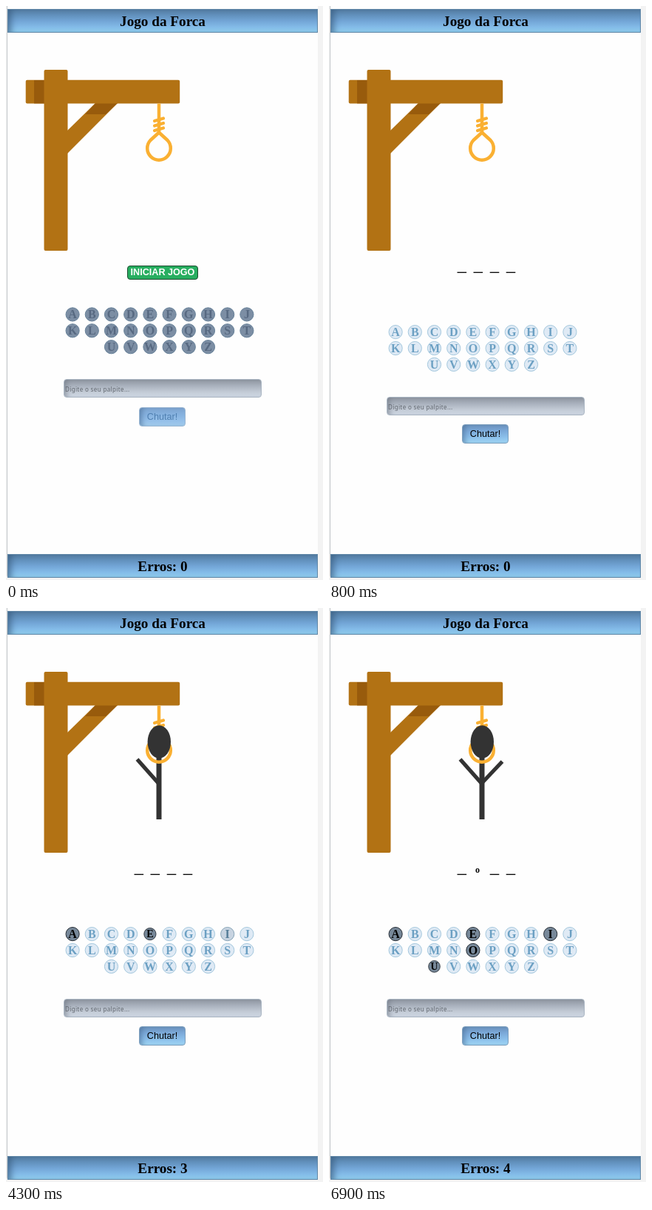
Write an HTML page that moves like this. It is 429 by 774 pixels and loops after 8000 ms.

```html
<!DOCTYPE html>
<html lang="pt">
<head>
<meta charset="utf-8">
<title>Jogo da Forca</title>
<style>
html, body { margin: 0; width: 100%; height: 100%; overflow: hidden; background: #f3f3f3; }
#stage { position: absolute; left: 0; top: 0; width: 429px; height: 774px; overflow: hidden; }
#stage > * { position: absolute; box-sizing: border-box; }
#page { left: 1px; top: 0; width: 421px; height: 771px; background: #fefefe;
  border-left: 1px solid #c4c8cc; border-bottom: 1px solid #b4bcc2; border-bottom-left-radius: 4px; }
.bar { left: 2px; width: 420px; height: 32px; border: 1px solid #5f86a6;
  background: linear-gradient(#547da3, #6291bd 25%, #73a6d7 52%, #83bbe8 78%, #92d0f1);
  box-shadow: inset 8px 0 9px -4px rgba(50, 85, 120, .65);
  font: bold 19.2px/32px "Liberation Serif", "Times New Roman", serif;
  text-align: center; color: #000; line-height: 31px; }
#guess { left: 78px; width: 268px; height: 25px; border: 1px solid #a9b5c2; border-radius: 4px;
  background: linear-gradient(#9097a2, #a9b1bd 35%, #c2cad5 70%, #d3dce8);
  box-shadow: inset 6px 0 7px -3px rgba(110, 118, 130, .6);
  font: 8px/25px "Noto Sans", sans-serif; letter-spacing: .37px; color: #626870; padding-left: 1px; }
#kick { left: 180px; width: 63px; height: 26px; border: 1px solid #7d9fbd; border-radius: 4px;
  background: linear-gradient(#6c94bf, #7caada 35%, #8cc0eb 70%, #a2daf8);
  box-shadow: inset 6px 0 7px -3px rgba(70, 105, 145, .6);
  font: 12.6px/24px "Liberation Sans", Arial, sans-serif; text-align: center; color: #000; }
#kick.off { color: #4f7fb0; border-color: #9ab6d2;
  background: linear-gradient(#7fa6d2, #87b3e0 40%, #96c1ea 75%, #a5d0f0); }
#start { left: 164px; top: 350px; width: 96px; height: 19px; border: 1px solid #1b4a2e;
  border-radius: 4px; background: #27ae60; color: #fff;
  font: bold 12.6px/17px "Liberation Sans", Arial, sans-serif; text-align: center; white-space: nowrap; }
svg { left: 0; top: 0; }
svg text { font-family: "Liberation Serif", "Times New Roman", serif; font-weight: bold; text-anchor: middle; }
</style>
</head>
<body>
<div id="stage">
  <div id="page"></div>
  <div class="bar" style="top:4px">Jogo da Forca</div>
  <div class="bar" style="top:739px" id="errors">Erros: 0</div>
  <div id="start">INICIAR JOGO</div>
  <div id="guess">Digite o seu palpite...</div>
  <div id="kick">Chutar!</div>
  <svg width="429" height="774" viewBox="0 0 429 774">
    <g fill="#b27214">
      <path d="M83 168L122 130H152L83 199Z"/>
      <path d="M122 130H152L135 146H107Z" fill="#985b0c"/>
      <rect x="26.7" y="99.8" width="208.5" height="31.8" rx="2"/>
      <rect x="38" y="100" width="14" height="31.4" fill="#985b0c"/>
      <rect x="51.5" y="86" width="32" height="244" rx="2"/>
    </g>
    <g stroke="#333" fill="none">
      <path id="body" d="M207 195V285" stroke-width="7"/>
      <path id="armL" d="M177.5 204L206 236" stroke-width="5.2"/>
      <path id="armR" d="M234.5 207L206 237" stroke-width="5.2"/>
    </g>
    <g stroke="#fab032" stroke-width="4.5" fill="none" stroke-linecap="round">
      <path d="M207 131.5V172" stroke-linecap="butt"/>
      <path d="M201 155L213 151.5M201 161.5L213 158M201 168L213 164.5" stroke-width="4.2"/>
      <path d="M207 170.5L195.5 181A15.8 15.8 0 1 0 218.5 181Z" stroke-linejoin="round"/>
    </g>
    <ellipse id="head" cx="207.3" cy="180.5" rx="15.7" ry="22.2" fill="#333"/>
    <g id="word" stroke="#000" stroke-width="1.3"></g>
    <text id="found" x="201" y="357" font-size="12">o</text>
    <g id="keys" font-size="16"></g>
  </svg>
</div>
<script>
const LOOP = 8000, BEGIN = 500;
const CLICKS = { A: 2100, E: 3300, I: 4300, O: 5400, U: 6600 };
const times = Object.values(CLICKS);
const MISSES = [2100, 3300, 4300, 6600];
const SHOWN = { head: 2200, body: 3300, armL: 4300, armR: 6600, found: 5400 };

// Colours: fill, letter, outline
const LOCKED = [[124, 142, 164], [87, 105, 129], [101, 128, 152]];
const WAKING = [[130, 146, 166], [98, 114, 137], [130, 146, 166]];
const READY = [[223, 234, 245], [108, 160, 195], [163, 199, 221]];
const USED = [[119, 136, 153], [0, 0, 0], [35, 42, 50]];
const FADE_IN = [0, .4, .8, 1];
const PRESS = [.22, .6, .88, 1];

const $ = id => document.getElementById(id);
const add = (parent, tag, attrs) => {
  const el = document.createElementNS("http://www.w3.org/2000/svg", tag);
  for (const k in attrs) el.setAttribute(k, attrs[k]);
  return parent.appendChild(el);
};

// Transitions advance in steps of 100 ms
const stepped = (t, from, table) =>
  t < from ? 0 : table[Math.min(3, Math.floor((t - from) / 100))];
const mix = (a, b, p) => a.map((c, i) =>
  "rgb(" + c.map((v, j) => Math.round(v + (b[i][j] - v) * p)) + ")");

const dashes = [173.5, 195.5, 217.7, 239.7].map(x =>
  add($("word"), "path", { d: `M${x} 359.3h12.6` }));

const keys = [..."ABCDEFGHIJKLMNOPQRSTUVWXYZ"].map((ch, i) => {
  const row = Math.floor(i / 10), col = i % 10 + (row === 2 ? 2 : 0);
  const g = add($("keys"), "g", {});
  const disc = add(g, "circle", { r: 9.1 });
  const label = add(g, "text", { y: 5.2 });
  label.textContent = ch;
  return { ch, g, disc, label, x: 90.1 + col * 26.2, y: 439.6 + row * 21.9 };
});

function drawKey(key, t, shift) {
  const click = CLICKS[key.ch];
  let colours, scale = 1;
  if (t < BEGIN) colours = mix(LOCKED, LOCKED, 0);
  else if (click === undefined || t < click) colours = mix(WAKING, READY, stepped(t, BEGIN, FADE_IN));
  else {
    const next = times[times.indexOf(click) + 1] ?? Infinity;
    colours = mix(READY, USED, stepped(t, click, PRESS));
    const held = Math.max(0, stepped(t, click, FADE_IN) - stepped(t, next, PRESS));
    scale = 1 - .14 * held;
  }
  const [fill, ink, line] = colours;
  key.disc.setAttribute("fill", fill);
  key.disc.setAttribute("stroke", line);
  key.label.setAttribute("fill", ink);
  key.g.setAttribute("transform", `translate(${key.x} ${key.y - shift}) scale(${scale})`);
}

function render(t) {
  const started = t >= BEGIN, shift = started ? 0 : 23.7;
  $("start").style.display = started ? "none" : "block";
  $("word").style.display = started ? "" : "none";
  $("guess").style.top = (started ? 527 : 503) + "px";
  $("kick").style.top = (started ? 564 : 541) + "px";
  $("kick").className = started ? "" : "off";
  $("errors").textContent = "Erros: " + MISSES.filter(m => t >= m).length;
  for (const id in SHOWN) $(id).style.display = t >= SHOWN[id] ? "" : "none";
  dashes[1].style.display = t >= SHOWN.found ? "none" : "";
  keys.forEach(key => drawKey(key, t, shift));
}

const origin = performance.now();
function tick() {
  render((performance.now() - origin) % LOOP);
  requestAnimationFrame(tick);
}
tick();
</script>
</body>
</html>
```
